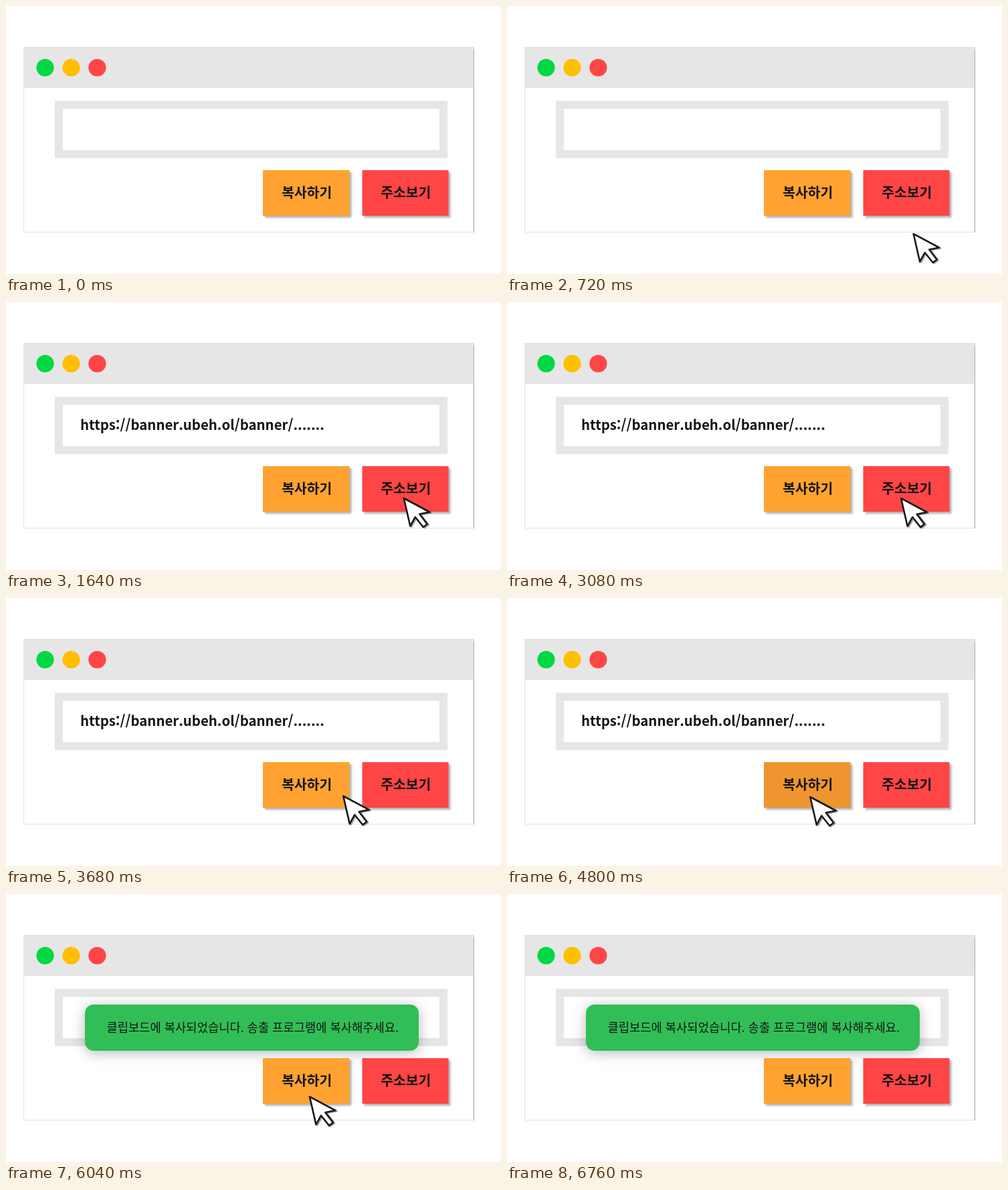
An HTML page for the animation above (8000 ms loop, 740x400 px).

```html
<!DOCTYPE html>
<html lang="ko">
<head>
<meta charset="utf-8">
<style>
  html, body { margin: 0; width: 100%; height: 100%; overflow: hidden; background: #fff; }
  svg { display: block; width: 740px; height: 400px; }
  text { font-family: "Noto Sans CJK KR", "Noto Sans CJK", "Noto Sans", sans-serif; fill: #141414; }
  .bold { font-weight: 700; font-size: 20.4px; }
  .button { filter: drop-shadow(3px 3px 1.5px rgba(0, 0, 0, .3)); }
  .card { filter: drop-shadow(0 3px 10px rgba(0, 0, 0, .28)); }
  #cursor { filter: drop-shadow(2px 1.5px .6px rgba(0, 0, 0, .35)); }
</style>
</head>
<body>
<svg viewBox="0 0 740 400">
  <!-- browser window -->
  <rect x="26.5" y="61.5" width="672.5" height="276" fill="#fff" stroke="#e2e2e2"/>
  <rect x="26" y="61.5" width="673" height="61" fill="#e6e6e6"/>
  <path d="M699.4 64V338" stroke="#a9a9a9"/>
  <circle cx="58.5" cy="92" r="13.1" fill="#00d944"/>
  <circle cx="97.4" cy="92" r="13.1" fill="#ffbf00"/>
  <circle cx="136.4" cy="92" r="13.1" fill="#ff4545"/>

  <!-- address field -->
  <rect x="79" y="147.5" width="575" height="73.5" fill="#fff" stroke="#e6e6e6" stroke-width="12"/>
  <text id="address" class="bold" x="111" y="190.8">https://banner.ubeh.ol/banner/.......</text>

  <g id="toast">
    <rect class="card" x="118" y="165" width="499" height="69" rx="13" fill="#31be57"/>
    <text x="150.5" y="205.6" font-size="17.7">클립보드에 복사되었습니다. 송출 프로그램에 복사해주세요.</text>
  </g>

  <rect id="copy" class="button" x="384" y="245" width="129.5" height="68"/>
  <rect id="shade" x="384" y="245" width="129" height="6" fill="#000" opacity=".12"/>
  <text class="bold" x="412.3" y="286.4">복사하기</text>
  <rect id="show" class="button" x="532.5" y="245" width="129" height="68"/>
  <text class="bold" x="560.3" y="286.4">주소보기</text>

  <path id="cursor" d="M0 0L38.5 20.5L23.5 23.5L35 38.5L29 43L17 28L9.5 41.5Z"
        fill="#fff" stroke="#1a1a1a" stroke-width="2.6" stroke-linejoin="round"/>
</svg>
<script>
  const LOOP = 8000, STEP = 40;
  const SHOW = 1200, COPY = 4760, PRESS = 200, RELEASE = 240;
  const ORANGE = [255, 162, 49], ORANGE_DOWN = [169, 96, 41];
  const RED = [255, 69, 69], RED_DOWN = [155, 164, 69];

  // Each move takes one second: start time, from, to
  const moves = [
    [40, [635, 440], [594.8, 293]],
    [3040, [594.8, 293], [453.3, 297]],
    [6000, [453.3, 297], [470.3, 437]]
  ];

  const el = id => document.getElementById(id);
  const clamp = v => Math.max(0, Math.min(1, v));
  const mix = (a, b, k) => a.map((v, i) => v + (b[i] - v) * k);
  const rgb = c => `rgb(${c.map(Math.round)})`;
  const visible = (id, on) => el(id).style.display = on ? '' : 'none';

  // Rises while the button is pressed, then falls back
  const pressed = t => clamp(Math.min(t / PRESS, (PRESS + RELEASE - t) / RELEASE));

  function draw(t) {
    const [start, from, to] = moves.filter(m => m[0] <= t).pop() || moves[0];
    const pos = mix(from, to, clamp((t - start) / 1000));
    el('cursor').setAttribute('transform', `translate(${pos})`);

    const copied = t >= COPY + PRESS;
    el('show').setAttribute('fill', rgb(mix(RED, RED_DOWN, pressed(t - SHOW))));
    el('copy').setAttribute('fill', rgb(mix(ORANGE, ORANGE_DOWN, pressed(t - COPY))));
    visible('address', t >= SHOW + PRESS && !copied);
    visible('toast', copied);
    visible('shade', copied && t < COPY + PRESS + RELEASE);
  }

  const origin = performance.now();
  function frame() {
    const t = (performance.now() - origin) % LOOP;
    draw(Math.floor(t / STEP) * STEP);
    requestAnimationFrame(frame);
  }
  frame();
</script>
</body>
</html>
```
